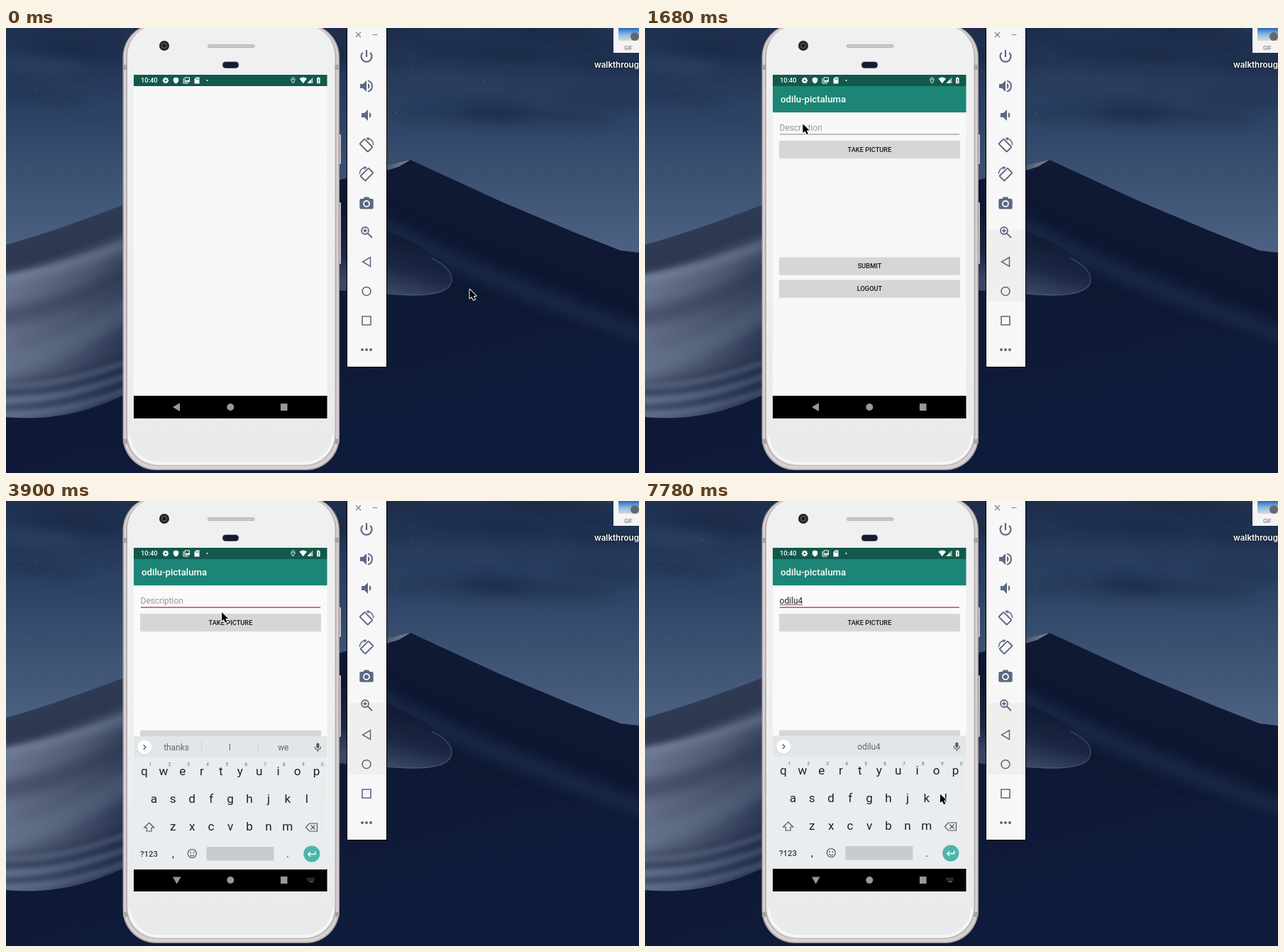
These frames come from a looping animation (892x628 px, 8 s). An HTML page with a canvas:

```html
<!DOCTYPE html>
<html lang="en">
<head>
<meta charset="utf-8">
<title>Emulator walkthrough</title>
<style>
html, body { margin: 0; width: 892px; height: 628px; overflow: hidden; background: #101c38; }
canvas { display: block; }
</style>
</head>
<body>
<canvas id="stage" width="892" height="628"></canvas>
<script>
const W = 892, H = 628, LOOP = 8000;
const canvas = document.getElementById('stage');
let ctx = canvas.getContext('2d');
const NAME = 'odilu', TITLE = NAME + '-pictaluma';
const ICON = '#5c6885', PINK = '#d81b60';
const LEFT = 180, WIDTH = 272.5;

// Drawing helpers
function rect(x, y, w, h, color) { ctx.fillStyle = color; ctx.fillRect(x, y, w, h); }
function round(x, y, w, h, r, color) {
  ctx.beginPath(); ctx.roundRect(x, y, w, h, r); ctx.fillStyle = color; ctx.fill();
}
function disc(x, y, r, color) {
  ctx.beginPath(); ctx.arc(x, y, r, 0, 7); ctx.fillStyle = color; ctx.fill();
}
function shape(d, color) { ctx.fillStyle = color; ctx.fill(new Path2D(d)); }
function line(d, color, width = 1) {
  ctx.strokeStyle = color; ctx.lineWidth = width; ctx.stroke(new Path2D(d));
}
function text(s, x, y, size, color, align = 'center', weight = 400, family = 'Roboto') {
  ctx.font = `${weight} ${size}px ${family}, sans-serif`;
  ctx.textAlign = align; ctx.fillStyle = color; ctx.fillText(s, x, y);
}
function gradient(x0, y0, x1, y1, ...colors) {
  const g = ctx.createLinearGradient(x0, y0, x1, y1);
  colors.forEach((c, i) => g.addColorStop(i / (colors.length - 1), c));
  return g;
}
function at(x, y, draw, angle = 0) {
  ctx.save(); ctx.translate(x, y); ctx.rotate(angle); draw(); ctx.restore();
}
function randomizer(seed) {
  return () => (seed = seed * 16807 % 2147483647) / 2147483647;
}

// Value of the last entry whose time has passed
function latest(track, t) {
  let found = track[0];
  for (const entry of track) if (entry[0] <= t) found = entry;
  return found;
}

function drawDesktop() {
  const rnd = randomizer(41);
  rect(0, 0, W, H, gradient(0, 0, 0, 310, '#1f2f4e', '#293e60', '#3b5172', '#4c6182'));
  ctx.filter = 'blur(9px)';
  for (let i = 0; i < 24; i++) {
    ctx.beginPath();
    ctx.ellipse(rnd() * W, rnd() * 125, 40 + rnd() * 70, 4 + rnd() * 8, 0.06, 0, 7);
    ctx.fillStyle = i % 3 ? 'rgba(20,32,56,.34)' : 'rgba(62,82,114,.22)';
    ctx.fill();
  }
  ctx.filter = 'none';
  for (let i = 0; i < 75; i++) {
    rect(Math.floor(rnd() * W), Math.floor(rnd() * 230), 1, 1, `rgba(170,190,215,${0.15 + rnd() * 0.35})`);
  }

  // Far mountain
  shape('M465 216 L537 195 L570 186 L600 200 L700 246 L800 288 L866 314 L892 317 V628 H465Z',
    gradient(670, 210, 600, 400, '#101a34', '#0d1731', '#0e1934'));
  shape('M537 194 L570 186 L553 196 L537 201Z', gradient(537, 195, 570, 188, '#4f5a70', '#838791'));
  ctx.filter = 'blur(10px)';
  line('M500 262 C620 332 770 386 910 440', 'rgba(42,62,102,.5)', 20);
  ctx.filter = 'none';
  shape('M465 262 C545 285 620 318 628 353 C630 374 596 381 537 375 L465 370Z',
    gradient(575, 305, 555, 378, '#121c36', '#1b2743', '#3a4762'));
  line('M600 325 C618 334 627 344 628 353 C630 374 596 381 537 375', 'rgba(115,128,155,.5)', 1.2);
  shape('M0 510 H465 V370 L537 376 C660 390 790 420 892 450 V628 H0Z',
    gradient(200, 400, 260, 628, '#0e1934', '#0e1936', '#0e1b3a'));

  // Near dune on the left
  ctx.save();
  ctx.clip(new Path2D('M0 306 C60 289 112 270 172 247 V515 C110 545 60 554 0 549Z'));
  rect(0, 240, 180, 320, gradient(60, 285, 85, 350, '#303b53', '#2d3850', '#434f69'));
  ctx.filter = 'blur(3px)';
  shape('M-20 352 C60 339 115 320 190 292 V580 H-20Z', gradient(0, 390, 175, 450, '#67738c', '#4d5973', '#28344f'));
  ctx.filter = 'blur(7px)';
  line('M-20 356 C60 345 115 324 190 298', 'rgba(134,147,171,.55)', 10);
  line('M-20 410 C60 400 110 378 190 335', 'rgba(36,47,72,.4)', 26);
  line('M-20 480 C70 462 120 430 190 385', 'rgba(118,132,158,.28)', 30);
  line('M-20 508 C70 499 120 485 190 460', 'rgba(32,43,69,.5)', 14);
  ctx.filter = 'blur(3px)';
  for (let i = 0; i < 5; i++) {
    const y = 506 + i * 10;
    line(`M-20 ${y} C50 ${y} 100 ${y - 8} 190 ${y - 42}`, i % 2 ? 'rgba(28,41,69,.45)' : 'rgba(116,130,157,.4)', 7);
  }
  ctx.restore();

  // Desktop file
  rect(856, 0, 36, 35, '#f4f4f5');
  rect(863, 0, 29, 18, gradient(0, 0, 0, 18, '#2867b7', '#85b9e6', '#dedbd0'));
  disc(886, 12, 6, '#65676b');
  text('GIF', 877, 31, 7.5, '#777', 'center', 500, 'Inter');
  ctx.shadowColor = '#000'; ctx.shadowBlur = 3;
  text('walkthrough', 829, 56, 11.6, '#fff', 'left', 600, 'Inter');
  ctx.shadowBlur = 0;
}

function drawPhone() {
  round(468, 150, 4, 42, 1, '#c5bdbd');
  round(468, 246, 4, 87, 1, '#c5bdbd');
  round(164.5, -6, 305.5, 630, 47, '#a9a0a3');
  round(166, -5, 302.5, 627.5, 46, '#d9d2d2');
  round(169, -4, 296.5, 622, 44, '#b8b1b3');
  round(171, -4, 292.5, 621, 43, gradient(0, 0, 0, 620, '#eff0f0', '#edefef', '#e8eaeb'));
  line('M174 575 C175 597 192 614 216 614 H419 C443 614 460 597 461 575', '#f8f8f8', 3);
  for (const y of [52, 580]) {
    rect(165, y, 6, 7, '#aaa1a3');
    rect(463.5, y, 6, 7, '#aaa1a3');
  }
  disc(223, 25, 7, '#202126');
  disc(223, 25, 4.5, '#43454d');
  disc(223, 25, 2, '#0d0e12');
  round(284, 23, 66.5, 5, 2.5, '#b8b6b6');
  round(285, 24, 64.5, 3, 1.5, '#c9c7c7');
  round(304.5, 47, 24, 10, 5, '#a5a5ac');
  round(305.5, 48, 22, 8.5, 4, '#171b31');
}

function drawPanel() {
  rect(480, 0, 57, 479, '#000');
  rect(481, 0, 55, 478, '#f7f7f7');
  line('M493 6 L500 13 M500 6 L493 13 M516.5 9.5 H523.5', '#777d8a', 1.1);
  at(508, 40, () => line('M-5.2 -5.2 A7.5 7.5 0 1 0 5.2 -5.2 M0 -9 V1', ICON, 2.2));
  at(508, 82, () => {
    shape('M-9 -3 H-5 L0 -8 V8 L-5 3 H-9Z M2 -4 C5.3 -2.3 5.3 2.3 2 4Z', ICON);
    line('M2 -7.6 C10 -5.6 10 5.6 2 7.6', ICON, 2);
  });
  at(508, 123, () => shape('M-7 -3 H-3 L2 -8 V8 L-3 3 H-7Z M4 -4 C7.3 -2.3 7.3 2.3 4 4Z', ICON));
  for (const [y, flip] of [[165, 1], [206, -1]]) at(508, y, () => {
    ctx.scale(flip, 1);
    line('M0.5 -9.3 C6 -9 9.3 -5.5 9.7 0', ICON, 1.5);
    shape('M-0.5 -10 L4 -10.5 L2.6 -6Z', ICON);
    ctx.translate(-0.5, 0.7);
    ctx.rotate(Math.PI / 4);
    ctx.beginPath(); ctx.roundRect(-8, -4.8, 16, 9.6, 1);
    ctx.strokeStyle = ICON; ctx.lineWidth = 1.9; ctx.stroke();
  });
  at(508, 247, () => {
    round(-9.7, -6, 19.4, 14.6, 2, ICON);
    shape('M-5 -5.5 L-3 -8.6 H3 L5 -5.5Z', ICON);
    disc(0, 1, 4.9, '#f7f7f7');
    disc(0, 1, 3.1, ICON);
  });
}

// Lower icons sit above the shaded part of the panel
function drawPanelButtons() {
  at(506, 286, () => line('M5 0 A5 5 0 1 0 -5 0 A5 5 0 1 0 5 0 M4 4 L10 10 M-2.5 0 H2.5 M0 -2.5 V2.5', ICON, 1.8));
  at(508, 330, () => line('M5.5 -6.5 V6.5 L-5.5 0Z', ICON, 1.5));
  at(508, 371.5, () => line('M6 0 A6 6 0 1 0 -6 0 A6 6 0 1 0 6 0', ICON, 1.6));
  at(508, 413, () => line('M-6 -6 H6 V6 H-6Z', ICON, 1.6));
  for (const dx of [-6, 0, 6]) disc(508 + dx, 454, 2, ICON);
}

function drawStatus(t) {
  rect(LEFT, 66, WIDTH, 16, '#11594c');
  text('10:40', 190, 77.3, 9.3, '#fff', 'left', 500);
  at(225, 74, () => {
    for (let i = 0; i < 4; i++) { ctx.rotate(Math.PI / 4); rect(-1, -4.2, 2, 8.4, '#fff'); }
    disc(0, 0, 3.1, '#fff');
    disc(0, 0, 1.3, '#11594c');
  });
  shape('M239.5 69.5 L243.2 71 V74 C243.2 76.3 241.5 77.8 239.5 78.5 C237.5 77.8 235.8 76.3 235.8 74 V71Z', '#fff');
  line('M250 71 V78 H257 M252 70 H258.5 V76 H252Z', '#fff', 1);
  shape('M252 75.5 L254 73 L255.5 74.5 L257 72.5 L258.5 75.5Z', '#fff');
  shape('M268 69.5 H272.5 V78.5 H265.5 V72Z', '#fff');
  rect(268.2, 71, 1, 2, '#11594c');
  rect(270.2, 71, 1, 2, '#11594c');
  disc(283.5, 74, 1.1, '#fff');
  if (t < 5540) {
    line('M404.5 78 C400 72.8 402.5 70 404.5 70 C406.5 70 409 72.8 404.5 78Z', '#fff', 1);
    disc(404.5, 72.7, 0.9, '#fff');
  }
  shape('M413.5 71.5 Q418.5 67.5 424 71.5 L418.7 78.3Z', '#fff');
  shape('M432.5 69.5 V78 H424.5Z', 'rgba(255,255,255,.6)');
  shape('M429.5 72.8 V78 H424.5Z', '#fff');
  shape('M438 70.5 H439.2 V69.5 H441.2 V70.5 H442.6 V78.3 H438Z', '#fff');
  rect(439.9, 72.2, 1, 3, '#11594c');
  rect(439.9, 76, 1, 1, '#11594c');
}

function drawButton(label, y) {
  round(189, y + 1, 255, 24.6, 1.5, '#e0e1e1');
  round(189, y, 255, 24.5, 1.5, '#d5d7d6');
  text(label, 316.5, y + 15.7, 9.27, '#151515', 'center', 500);
}

function drawApp(t, typed) {
  const focused = t >= 3010;
  rect(LEFT, 119, WIDTH, 1.5, '#e6e8e7');
  rect(LEFT, 82, WIDTH, 37, '#1d8575');
  text(TITLE, 191, 105.3, 13.24, '#fff', 'left', 500);
  text(typed || 'Description', 189.6, 144.7, 11.92, typed ? '#222' : '#999', 'left');
  const end = 189.6 + (typed ? ctx.measureText(typed).width : 0);
  if (typed) rect(190, 146, end - 190, 0.8, '#444');
  rect(190, 149.5, 253, focused ? 1.3 : 1, focused ? PINK : '#858585');
  if (focused && latest(caret, t)[1]) rect(end, 132, 1.4, 16, PINK);
  drawButton('TAKE PICTURE', 159);
  drawButton('SUBMIT', 323.5);
  drawButton('LOGOUT', 355.5);
}

function drawNav(t) {
  const grey = '#989898';
  rect(LEFT, 519, WIDTH, 32, '#000');
  if (t < 3300) shape('M245 529 V541 L235 535Z', grey);
  else {
    shape('M235 530.5 H246.5 L240.7 540.5Z', grey);
    for (let i = 0; i < 10; i++) rect(424.5 + i % 5 * 2.2, 532 + Math.floor(i / 5) * 2.2, 1.1, 1.1, grey);
    rect(427, 536.6, 6, 1.1, grey);
  }
  disc(316.3, 535, 5, grey);
  rect(387, 530, 9.5, 10, grey);
}

function suggestions(typed) {
  if (!typed) return ['thanks', 'I', 'we'];
  if (typed.length > NAME.length) return ['', typed, ''];
  const cap = typed[0].toUpperCase() + typed.slice(1);
  return [typed, cap, cap + "'s"];
}

function drawKeyboard(typed) {
  const ink = '#16252c', soft = '#5f686c';
  rect(LEFT, 331, WIDTH, 188, '#e9edf0');
  rect(LEFT, 331, WIDTH, 29.5, '#e2e6e9');
  disc(195.3, 347.2, 10.2, '#d0d4d6');
  disc(195.3, 346.5, 10, '#fff');
  line('M193.7 343.2 L197 346.5 L193.7 349.8', '#444', 1.2);
  const words = suggestions(typed), strong = typed === NAME;
  words.forEach((word, i) => text(word, 240 + i * 75.4, 350.7, 11.9,
    strong && i === 1 ? '#111' : soft, 'center', strong && i === 1 ? 700 : 400));
  if (words[0]) for (const x of [275, 355]) rect(x, 338, 1, 16, '#ccd1d4');
  round(437.4, 340.5, 4, 7.5, 2, '#505a5f');
  line('M435.3 345.5 C435.3 351.5 443.5 351.5 443.5 345.5 M439.4 350 V353', '#505a5f', 1.1);

  [['qwertyuiop', 195, 386], ['asdfghjkl', 208.3, 424.8], ['zxcvbnm', 235.2, 464]].forEach(([keys, x, y], row) => {
    [...keys].forEach((key, i) => {
      text(key, x + i * 26.95, y, 17.2, ink);
      if (!row) text(String((i + 1) % 10), x + 8.3 + i * 26.95, 373, 6.6, '#5b6a71');
    });
  });
  line('M201.7 453 L208.7 460 H205 V465 H198.4 V460 H194.7Z', '#4a565c', 1.2);
  line('M427.5 454 H438.5 V465 H427.5 L422.5 459.5Z M429.5 456.5 L435.5 462.5 M435.5 456.5 L429.5 462.5', '#4a565c', 1.2);
  text('?123', 201.5, 500.7, 11.4, '#2f3c42', 'center', 500);
  text(',', 235.5, 501.5, 15, ink);
  line('M268.3 496.5 A6 6 0 1 0 256.3 496.5 A6 6 0 1 0 268.3 496.5 M259.3 498 Q262.3 502 265.3 498', '#4a565c', 1.2);
  disc(260.2, 495, 1, '#4a565c');
  disc(264.4, 495, 1, '#4a565c');
  round(282.5, 487, 95, 19.5, 1.5, '#c8ccce');
  text('.', 397, 501.5, 15, ink);
  disc(430.8, 497, 11.6, '#4db6ac');
  line('M435.8 493.5 V497.5 H426 M429 494.3 L425.8 497.5 L429 500.7', '#fff', 1.4);
}

function drawPointer(x, y) {
  at(x, y, () => {
    const arrow = 'M0.5 0.5 V13 L3.4 10.4 L5.6 15.3 L7.9 14.3 L5.8 9.6 H9.7Z';
    ctx.lineJoin = 'round';
    line(arrow, '#fff', 2);
    shape(arrow, '#000');
    ctx.lineJoin = 'miter';
  });
}

// Tracks: [time, value...]
const pointer = [
  [0, 653, 368.5], [940, 459, 286], [1090, 186, 106], [1380, 197, 113], [1530, 214, 128], [1680, 222, 135],
  [2280, 235, 134], [2430, 260, 136], [2580, 281, 139], [2720, 289, 140],
  [3160, 293, 145], [3300, 300, 153], [3450, 303.5, 156.5],
  [7480, 335, 225], [7630, 397, 378], [7780, 415.5, 413]
];
const typing = [[0, 0], [4050, 1], [4200, 2], [4350, 3], [4640, 4], [4940, 5], [6290, 6]];
const caret = [[0, 1], [3900, 0], [4050, 1], [5390, 0], [5840, 1], [6740, 0], [7180, 1], [7630, 0]];
const keyboard = [[0, 188, 0], [3750, 36, 0.75], [3900, 1, 1], [4050, 0, 1]];

const desktop = document.createElement('canvas');
desktop.width = W; desktop.height = H;
const screenCtx = ctx;
ctx = desktop.getContext('2d');
drawDesktop();
drawPhone();
drawPanel();
ctx = screenCtx;

function render(t) {
  const typed = (NAME + '4').slice(0, latest(typing, t)[1]);
  ctx.drawImage(desktop, 0, 0);
  if (t >= 940) rect(481, 285, 55, 101, '#efefef');
  drawPanelButtons();
  rect(LEFT, 82, WIDTH, 437, t < 3750 ? '#f8f8f8' : '#fafafa');
  drawStatus(t);
  if (t >= 500) {
    ctx.globalAlpha = t < 650 ? 0.55 : 1;
    drawApp(t, typed);
    ctx.globalAlpha = 1;
  }
  drawNav(t);
  const [, drop, alpha] = latest(keyboard, t);
  if (alpha) {
    ctx.save();
    ctx.beginPath(); ctx.rect(LEFT, 82, WIDTH, drop > 1 ? 437 : 438); ctx.clip();
    ctx.globalAlpha = alpha;
    ctx.translate(0, drop);
    drawKeyboard(typed);
    ctx.restore();
  }
  const [, x, y] = latest(pointer, t);
  drawPointer(x, y);
}

function tick() {
  render(performance.now() % LOOP);
  requestAnimationFrame(tick);
}
tick();
</script>
</body>
</html>
```
